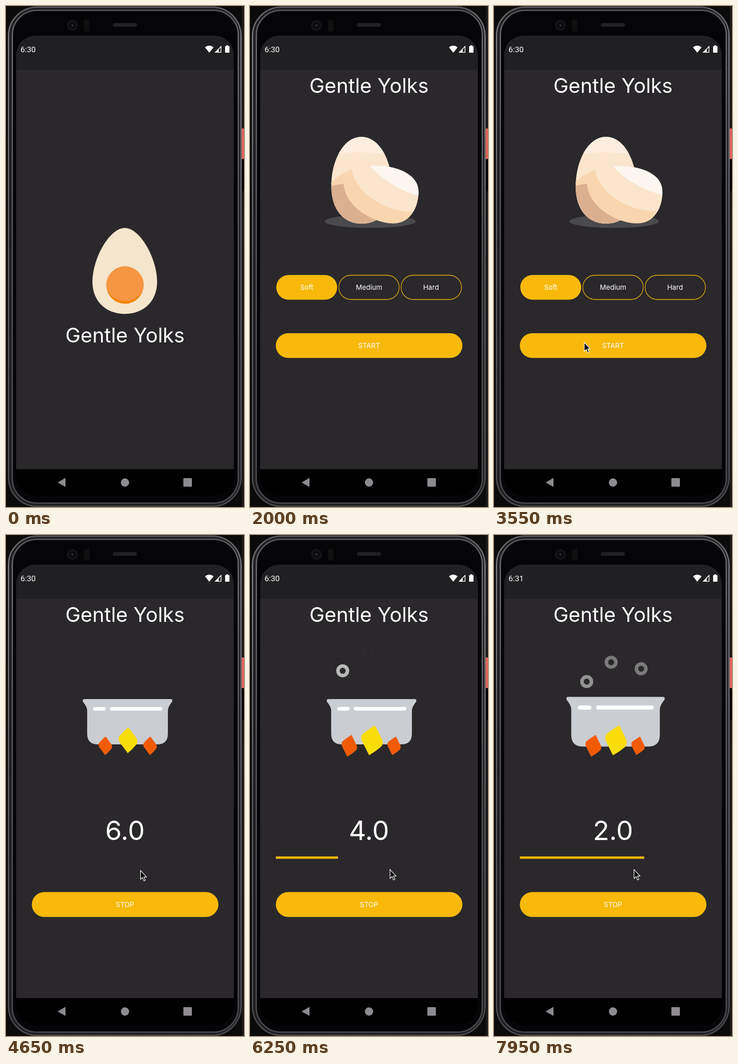
An HTML page for the animation above (8 s loop, 516 px wide and 1084 px high).

```html
<!DOCTYPE html>
<html lang="en">
<head>
<meta charset="utf-8">
<title>Egg timer</title>
<style>
  html, body { margin: 0; width: 100%; height: 100%; overflow: hidden; background: #0b0b0b; }
  svg { display: block; width: 516px; height: 1084px; }
  text { font: 15px Inter, sans-serif; fill: #fff; text-anchor: middle; }
  .title { font-size: 44px; }
  .count { font-size: 58px; }
  .clock { font: 17px Roboto, sans-serif; text-anchor: start; }
  .gold { fill: #f8b90b; }
  .outline { fill: none; stroke: #f8b90b; stroke-width: 1.3; }
  .ring { fill: none; stroke: #d6d6d6; stroke-width: 7.6; }
</style>
</head>
<body>
<svg viewBox="0 0 516 1084">
  <defs>
    <linearGradient id="rim" x2="0" y2="1">
      <stop stop-color="#5d5c60"/><stop offset=".06" stop-color="#77767a"/>
      <stop offset=".5" stop-color="#59585b"/><stop offset="1" stop-color="#4a494c"/>
    </linearGradient>
    <clipPath id="screen"><rect x="22" y="64" width="472" height="995" rx="42"/></clipPath>
    <path id="shell" d="M243 283C282 283 309 335 309 390C309 440 283 471 243 471C203 471 177 440 177 390C177 335 204 283 243 283Z"/>
    <clipPath id="inShell"><use href="#shell"/></clipPath>
    <path id="lying" d="M258 347C300 344 331 353 349 368C362 379 366 392 365 408C363 440 346 470 312 470.500C268 472 204 434 202 386C202 362 225 349 258 347Z"/>
    <clipPath id="inLying"><use href="#lying"/></clipPath>
    <path id="flame" d="M1-28Q-8-20-18-9Q-22-4-18 4L0 28Q10 20 18 10Q23 4 19-4Z"/>
  </defs>

  <!-- phone -->
  <rect x="511" width="5" height="1084" fill="#1a1a1a"/>
  <rect x="512" y="332" width="4" height="69"/>
  <rect x="511" y="265" width="5" height="66" fill="#df645c"/>
  <rect x="5.500" y="2.500" width="504" height="1080" rx="62" fill="#1c1b1e" stroke="url(#rim)" stroke-width="3"/>
  <rect x="13" y="9" width="491" height="1067" rx="54" fill="#050406" stroke="#333236" stroke-width="4"/>
  <rect x="14" y="9.500" width="489.500" height="1066" rx="53" fill="none" stroke="url(#rim)" stroke-width="2"/>
  <circle cx="144" cy="42" r="12" fill="#131315"/>
  <circle cx="144" cy="42" r="7" fill="#0b0b0d"/>
  <circle cx="144" cy="42" r="2" fill="#3a3a3e"/>
  <rect x="169" y="30" width="12" height="25" rx="2" fill="#101011"/>
  <rect x="231.500" y="37" width="52.500" height="8" rx="4" fill="#202022"/>
  <g clip-path="url(#screen)">
    <rect x="22" y="64" width="472" height="995"/>
    <rect x="22" y="64" width="472" height="75" fill="#201f21"/>
    <rect x="22" y="138" width="472" height="864" fill="#2a282b"/>
  </g>
  <text id="clock" class="clock" x="31.500" y="100"></text>
  <g fill="#fff">
    <path d="M431.500 89.500Q440.500 82 450 89.500L440.700 101Z"/>
    <path d="M467 85.500V101H452ZM465.500 89.500L461 94V99.500H465.500Z" fill-rule="evenodd"/>
    <path d="M477.500 87V85H482V87H484.500V101H475V87Z"/>
  </g>
  <g fill="#8d8b90">
    <path d="M112 1031L129 1021V1040.500Z"/>
    <circle cx="258" cy="1031" r="9"/>
    <rect x="384.500" y="1021.500" width="18.500" height="18.500" rx="1.500"/>
  </g>

  <text id="title" class="title" x="258">Gentle Yolks</text>

  <g id="splash">
    <path id="egg" fill="#f4e6cd" d="M0-101.500C36-101.500 76.500-30 76.500 26C76.500 72 44 101.500 0 101.500C-44 101.500-76.500 72-76.500 26C-76.500-30-36-101.500 0-101.500Z"/>
    <g id="yolk">
      <circle r="1" fill="#f48607"/>
      <path d="M-1 0A1 1 0 0 1 1 0A1 .84 0 0 1-1 0Z" fill="#f69643"/>
    </g>
  </g>

  <g id="home">
    <ellipse id="shadow" cx="260.500" cy="466" ry="14" fill="#4a494b"/>
    <g id="back"><g clip-path="url(#inShell)">
      <use href="#shell" fill="#fbe5cd"/>
      <path d="M170 280H320V324Q235 311 185 321H170Z" fill="#fdeee0"/>
      <path d="M170 387Q190 366 218 355L320 345V480H170Z" fill="#f9d6af"/>
      <path d="M170 391Q188 385 210 384L300 480H170Z" fill="#dbb091"/>
    </g></g>
    <g id="front"><g clip-path="url(#inLying)">
      <use href="#lying" fill="#f9d6af"/>
      <path d="M219 357C230 405 290 446 356 444H375V335H225Z" fill="#fbe5cd"/>
      <path d="M257 346C282 374 325 400 366 409V335H257Z" fill="#fdf6f0"/>
    </g></g>
    <rect class="gold" x="57" y="582" width="132" height="53.500" rx="26.700"/>
    <rect class="outline" x="192.500" y="582.500" width="131" height="52.500" rx="26.200"/>
    <rect class="outline" x="327.500" y="582.500" width="131" height="52.500" rx="26.200"/>
    <text x="123" y="614">Soft</text>
    <text x="258" y="614">Medium</text>
    <text x="392.500" y="614">Hard</text>
    <rect class="gold" x="56" y="708" width="404.500" height="53.500" rx="26.700"/>
    <text x="258" y="740">START</text>
  </g>

  <g id="timer">
    <g id="rings">
      <circle class="ring" cx="201" r="10.300"/>
      <circle class="ring" cx="254" r="10.300"/>
      <circle class="ring" cx="319" r="10.300"/>
    </g>
    <g id="pot">
      <path fill="#cacdd2" d="M169 355H358Q362 356 360 361Q351 372 351 380V430Q351 453 328 453H199Q176 453 176 430V380Q176 372 167 361Q165 356 169 355Z"/>
      <path d="M193 376H212M229 376H335" stroke="#fff" stroke-width="8" stroke-linecap="round"/>
    </g>
    <use id="leftFlame" href="#flame" fill="#f25b05"/>
    <use id="rightFlame" href="#flame" fill="#f25b05"/>
    <use id="midFlame" href="#flame" fill="#f9dd09"/>
    <text id="count" class="count" x="258" y="660"></text>
    <rect id="bar" class="gold" x="56" y="695.500" height="5"/>
    <rect class="gold" x="56" y="772.500" width="404.500" height="54" rx="27"/>
    <text x="258" y="805">STOP</text>
  </g>

  <path id="cursor" stroke="#fff" stroke-width="1.300" d="M.6 .8V20L5 16L8.300 23.400L11 22L8 14.800H13.500Z"/>
</svg>

<script>
const LOOP = 8000, HOME_AT = 1500, TIMER_AT = 3950, CURSOR_AT = 2150;
const FIRST_TICK = 4800, BOIL = 960, BOIL_ZERO = 6250;
const RINGS = [[4762, 350], [5328, 350], [6289, 364]]; // first rise, lowest y
const CURSOR = [[2150, 450, 670], [2550, 181, 694], [3000, 181, 694], [3500, 195, 727],
                [3950, 195, 727], [4550, 291, 725], [4650, 291, 725], [4850, 303, 723]];

const $ = id => document.getElementById(id);
const set = (el, name, value) => el.setAttribute(name, value);
const move = (id, value) => set($(id), 'transform', value);
const show = (id, on) => set($(id), 'visibility', on ? 'visible' : 'hidden');
const clamp = x => Math.min(1, Math.max(0, x));
const ease = x => x * x * (3 - 2 * x);
const mix = (a, b, k) => a + (b - a) * k;

function cursorAt(t) {
  const i = CURSOR.findIndex(p => p[0] > t);
  if (i < 0) return CURSOR.at(-1).slice(1);
  if (i === 0) return CURSOR[0].slice(1);
  const [t0, x0, y0] = CURSOR[i - 1], [t1, x1, y1] = CURSOR[i];
  const k = ease((t - t0) / (t1 - t0));
  return [mix(x0, x1, k), mix(y0, y1, k)];
}

function drawSplash(t) {
  const k = ease(clamp(t / 850));
  move('egg', `translate(257.5 573.3) scale(${mix(.916, 1, k)})`);
  move('yolk', `translate(258 603.8) scale(${mix(40.5, 51.7, k)})`);
}

function drawHome(t) {
  const rock = .5 + .5 * Math.cos((t - 2600) / 1900 * 2 * Math.PI);
  set($('shadow'), 'rx', mix(97.5, 101.5, rock));
  move('back', `rotate(${-1.8 * rock} 243 471)`);
  move('front', `rotate(${5 * rock} 305 412)`);
}

function drawTimer(t) {
  const angle = (t - BOIL_ZERO) / BOIL * 2 * Math.PI;
  const pulse = 1 + .098 * Math.max(0, -Math.sin(angle));
  move('pot', `translate(263.5 404) scale(${pulse}) translate(-263.5 -404)`);

  const burn = .5 + .5 * Math.cos(angle + .8);
  const flame = (id, x, y, size, grow) =>
    move(id, `translate(${x} ${y}) rotate(${12 * burn}) scale(${size * (1 + grow * burn)})`);
  flame('leftFlame', 215, 456, .72, .22);
  flame('rightFlame', 312, 456, .72, .02);
  flame('midFlame', 264, 444, 1, .21);

  RINGS.forEach(([start, low], i) => {
    const ring = $('rings').children[i];
    const u = t < start ? 0 : (t - start) / BOIL % 1;
    set(ring, 'cy', low - 102 * u);
    set(ring, 'opacity', .85 * Math.sin(Math.PI * u) ** 2);
  });

  const ticks = Math.max(0, Math.floor((t - FIRST_TICK) / 1000) + 1);
  $('count').textContent = (6 - ticks).toFixed(1);
  set($('bar'), 'width', 404.5 * ticks / 6);
}

function draw(now) {
  const t = now % LOOP;
  show('splash', t < HOME_AT);
  show('home', t >= HOME_AT && t < TIMER_AT);
  show('timer', t >= TIMER_AT);
  show('cursor', t >= CURSOR_AT);
  set($('title'), 'y', t < HOME_AT ? 728 : 188);
  $('clock').textContent = t < 7250 ? '6:30' : '6:31';
  move('cursor', `translate(${cursorAt(t)})`);
  drawSplash(t);
  drawHome(t);
  drawTimer(t);
  requestAnimationFrame(draw);
}
requestAnimationFrame(draw);
</script>
</body>
</html>
```
